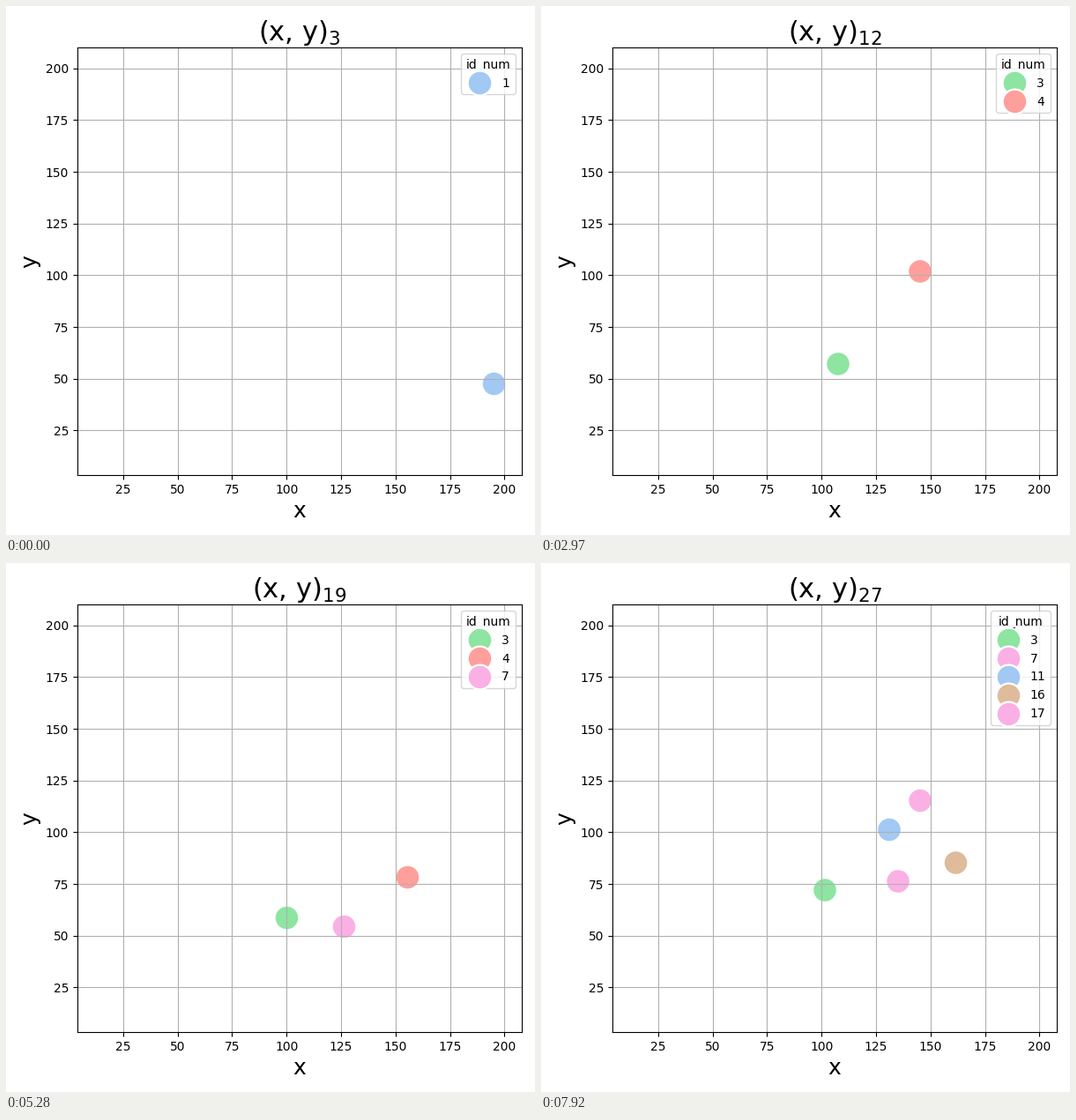
A matplotlib script for the animation above (8000 ms loop, 600 px wide and 600 px high).

```python
import numpy as np
import matplotlib.pyplot as plt
from matplotlib.animation import FuncAnimation
from matplotlib.lines import Line2D

SIZE, DPI = 600, 100
LOOP, TICK, HOLD = 8000, 40, 330        # ms
LEFT, RIGHT, TOP, BOTTOM = 81, 585, 47, 532
XLIM, YLIM = (4.05, 207.93), (3.39, 210.15)
FIRST = 3                               # counter value in the title at step 0

# seaborn-like pastel palette, cycled by id
PASTEL = ["#a1c9f4", "#ffb482", "#8de5a1", "#ff9f9b", "#d0bbff",
          "#debb9b", "#fab0e4", "#cfcfcf", "#fffea3", "#b9f2f0"]

# id: (visible step spans, knots of (step, x, y) in stage pixels)
TRACKS = {
    1: ([(0, 0)], [(0, 552.5, 427.5)]),
    2: ([(1, 2)], [(1, 434, 383), (2, 438, 372)]),
    3: ([(3, 24)], [(3, 354.5, 400), (4, 353.5, 399), (5, 353.5, 400),
                    (6, 347, 410), (7, 326.5, 406.5), (8, 333, 410),
                    (9, 337, 406), (10, 348, 397), (11, 348, 396),
                    (12, 333, 397), (13, 326, 399), (16, 318.5, 402.5),
                    (17, 318.5, 403), (19, 307, 399), (20, 304, 397),
                    (21, 330, 393.5), (22, 326, 388), (23, 316, 380),
                    (24, 322, 371)]),
    4: ([(3, 12), (16, 16), (20, 23)],
        [(3, 447, 352), (4, 443, 341), (5, 441, 330), (6, 449, 317),
         (7, 433, 304.5), (8, 432, 303), (9, 430, 301), (10, 436, 299),
         (11, 449, 298), (12, 449.5, 297.5), (16, 455.5, 356.5),
         (20, 440, 343), (21, 436, 338.5), (23, 435, 331)]),
    7: ([(13, 13), (15, 24)],
        [(13, 390, 424), (15, 386, 408), (16, 383.5, 412.5), (17, 384, 420),
         (18, 384, 420), (20, 383, 416), (21, 382.5, 410), (22, 385, 416),
         (23, 392, 400), (24, 405, 361)]),
    11: ([(17, 19), (21, 24)],
         [(17, 436, 262), (19, 428, 248), (21, 408.5, 231.5),
          (24, 395, 302.5)]),
    16: ([(24, 24)], [(24, 470.5, 340)]),
    17: ([(24, 24)], [(24, 430, 269.5)]),
}


def color(num):
    return PASTEL[(num - 1) % len(PASTEL)]


def to_data(px, py):
    x = XLIM[0] + (px - LEFT) / (RIGHT - LEFT) * (XLIM[1] - XLIM[0])
    y = YLIM[0] + (BOTTOM - py) / (BOTTOM - TOP) * (YLIM[1] - YLIM[0])
    return x, y


def visible(step):
    return [num for num, (spans, _) in TRACKS.items()
            if any(a <= step <= b for a, b in spans)]


def position(num, step):
    t, x, y = np.array(TRACKS[num][1], float).T
    return to_data(np.interp(step, t, x), np.interp(step, t, y))


def handle(num):
    return Line2D([], [], ls="", marker="o", ms=20, mew=1.6,
                  mfc=color(num), mec="white", label=str(num))


fig = plt.figure(figsize=(SIZE / DPI, SIZE / DPI), dpi=DPI)
ax = fig.add_axes([LEFT / SIZE, 1 - BOTTOM / SIZE,
                   (RIGHT - LEFT) / SIZE, (BOTTOM - TOP) / SIZE])
ax.set(xlim=XLIM, ylim=YLIM,
       xticks=range(25, 201, 25), yticks=range(25, 201, 25))
ax.set_xlabel("x", fontsize=18)
ax.set_ylabel("y", fontsize=18)
ax.grid(True)
dots = ax.scatter([], [], s=400, linewidths=1.6, edgecolors="white")


def update(frame):
    step = (frame * TICK + TICK - 1) // HOLD
    ids = visible(step)
    dots.set_offsets([position(num, step) for num in ids])
    dots.set_facecolor([color(num) for num in ids])
    ax.set_title(f"(x, y)$_{{{step + FIRST}}}$", fontsize=22)
    ax.legend(handles=[handle(num) for num in ids], title="id_num",
              loc="upper right")
    return dots,


anim = FuncAnimation(fig, update, frames=LOOP // TICK, interval=TICK,
                     repeat=True, repeat_delay=0)
plt.show()
```
